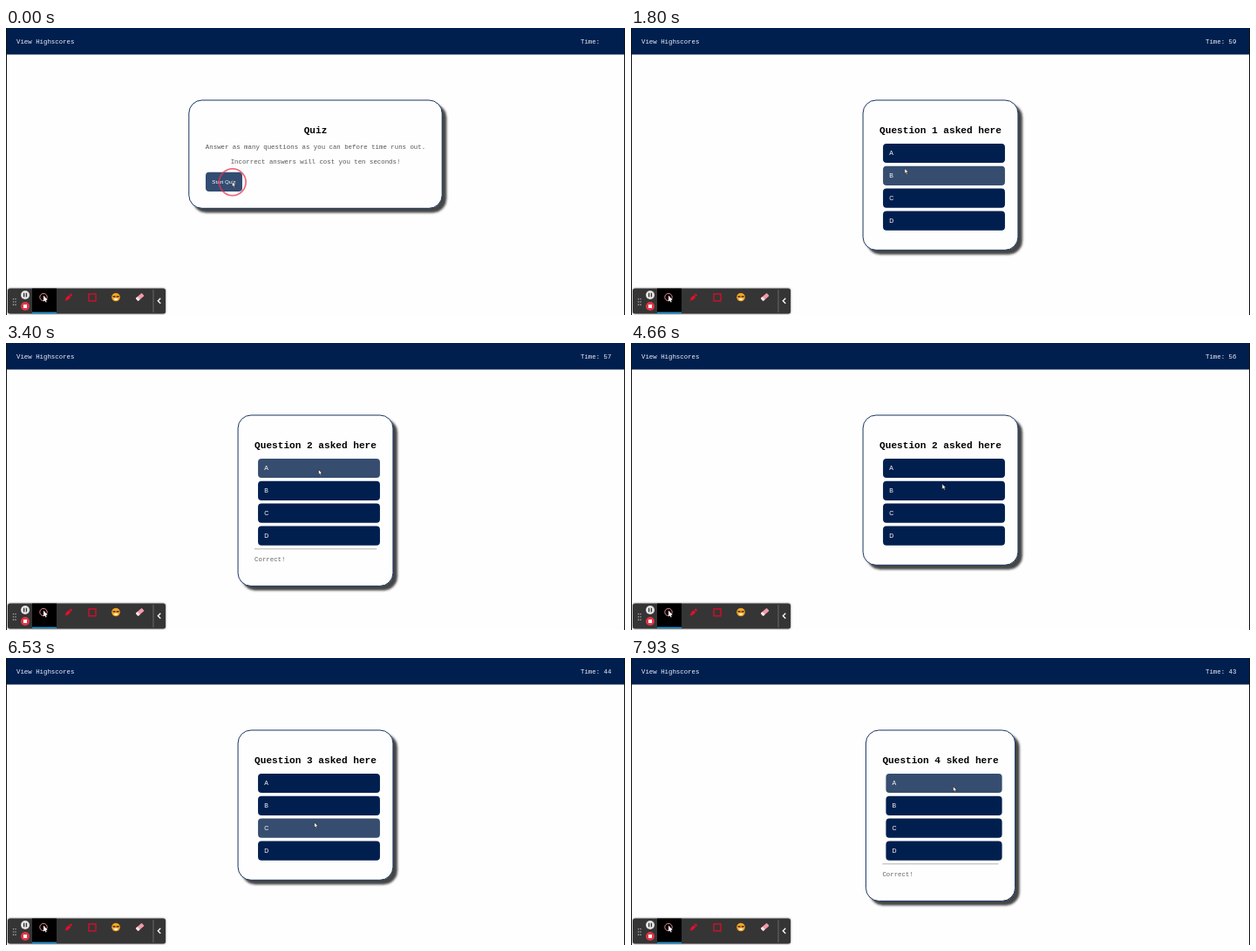
Write an HTML page that moves like this. It is 710x330 px and loops after 8000 ms.

```html
<!DOCTYPE html>
<html lang="en">
<head>
<meta charset="utf-8">
<title>Quiz</title>
<style>
  html, body { margin: 0; width: 100%; height: 100%; overflow: hidden; background: #fefefe; }
  svg { display: block; width: 710px; height: 330px; }
  text { white-space: pre; }
  .mono { font: 7.38px "Courier New", "Liberation Mono", monospace; }
  .title { font: bold 11.1px "Courier New", "Liberation Mono", monospace; fill: #000; }
  .nav { fill: #f0f3f8; }
  .body { fill: #555; }
  .button { font: 6.17px Arial, "Liberation Sans", sans-serif; fill: #fff; }
  .choice { font: 7px Arial, "Liberation Sans", sans-serif; fill: #fff; }
  .tool { font: bold 4.7px Roboto, sans-serif; fill: #fff; text-anchor: middle; }
  .mid { text-anchor: middle; }
</style>
</head>
<body>
<svg viewBox="0 0 710 330">
  <defs>
    <filter id="cardShadow" x="-10%" y="-10%" width="125%" height="125%">
      <feDropShadow dx="4.6" dy="4.6" stdDeviation="1.2" flood-color="#333" flood-opacity=".9"/>
    </filter>
    <filter id="barShadow" x="-5%" y="-20%" width="110%" height="140%">
      <feDropShadow dx="0" dy="0" stdDeviation="1.2" flood-opacity=".6"/>
    </filter>
  </defs>
  <rect width="710" height="330" fill="#fefefe"/>
  <rect width="710" height="30.5" fill="#001f4f"/>
  <path d="M.5 0V330M709.5 0V330" stroke="#111"/>
  <text class="mono nav" x="12" y="17.6">View Highscores</text>
  <text class="mono nav" x="659" y="17.6" id="timer"></text>

  <rect id="card" y="83" rx="15" fill="#fefefe" stroke="#1a3560" filter="url(#cardShadow)"/>
  <text id="heading" class="title mid" x="355" y="120.6"></text>

  <g id="intro">
    <text class="mono body mid" x="355" y="139.4">Answer as many questions as you can before time runs out.</text>
    <text class="mono body mid" x="355" y="156.4">Incorrect answers will cost you ten seconds!</text>
    <rect x="229" y="165.8" width="42" height="22.2" rx="4" fill="#334c72"/>
    <text class="button mid" x="250" y="179">Start Quiz</text>
  </g>
  <g id="choices"></g>
  <g id="feedback">
    <path id="rule" stroke="#aaa" stroke-width=".9"/>
    <text id="verdict" class="mono" fill="#666" y="251.4"></text>
  </g>

  <g id="toolbar">
    <rect x="2" y="299.5" width="181" height="29" rx="2.5" fill="#343434" filter="url(#barShadow)"/>
    <path d="M8.5 311v8M11 311v8" stroke="#aaa" stroke-width="1.3" stroke-dasharray="1.3 2"/>
    <circle cx="22" cy="307" r="5" fill="#e4e4e4"/>
    <path d="M20.6 304.7v4.6M23.4 304.7v4.6" stroke="#333" stroke-width="1.3"/>
    <circle cx="22" cy="320" r="5" fill="#e23645"/>
    <rect x="20" y="318" width="4" height="4" fill="#fff"/>
    <rect x="30" y="299.5" width="28" height="27.5" fill="#000"/>
    <rect x="30" y="326.6" width="28" height="1.5" fill="#1499dc"/>
    <circle cx="43" cy="309.5" r="4.2" fill="none" stroke="#e98791" stroke-width="1"/>
    <path d="M43 307.5v7l1.5-1.4 1.1 2.3 1.1-.5-1-2.2h2z" fill="#fff"/>
    <path d="M67.8 313.8l1-3.7 3.1-2.8 2.4 2.2-3 3.1zM72.5 306.7l1.6-1.4 2 2-1.3 1.5z" fill="#e0102c"/>
    <rect x="95" y="305.8" width="8" height="8" fill="none" stroke="#d20f2b" stroke-width="1.4"/>
    <circle cx="126" cy="309.5" r="4.8" fill="#f5a623"/>
    <path d="M122.3 308.1h3.2v1.5h-2.6zM126.7 308.1h3.2l-.6 1.5h-2.6z" fill="#4a2d18"/>
    <path d="M123.3 311q2.7 3.8 5.4 0z" fill="#fff"/>
    <g transform="rotate(-42 153.5 309.3)">
      <rect x="148.8" y="307.2" width="9.4" height="4.4" rx=".8" fill="#f29aab"/>
      <rect x="148.8" y="307.2" width="3" height="4.4" rx=".8" fill="#fbe1e5"/>
    </g>
    <path d="M169 301v26" stroke="#777" stroke-width=".8"/>
    <path d="M177.3 310.7l-3 3 3 3" fill="none" stroke="#fff" stroke-width="1.3"/>
  </g>

  <circle id="ring" fill="none" stroke="#e8384f" stroke-width="1.8"/>
  <path id="cursor" d="M0 0V6L1.4 4.8 2.4 7 3.5 6.5 2.5 4.4H4.4Z" fill="#fff" stroke="#222" stroke-width=".65"/>
</svg>
<script>
const LOOP = 8000;
const HOVER_LAG = 80;
const RING_TIME = 440;
const $ = id => document.getElementById(id);

// Cursor tip: time, x, y
const path = [
  [1260, 259.3, 176.7], [1700, 301, 166], [2150, 358.4, 145.4],
  [4500, 358.4, 145.4], [4580, 358, 157], [4660, 356.9, 162], [4900, 353.6, 189],
  [6560, 353.6, 189], [7200, 369.4, 147.5]
];
const clicks = [-40, 2930, 4930, 7330];
const scenes = [
  { at: 0, title: "Quiz" },
  { at: 260, title: "Question 1 asked here" },
  { at: 3140, title: "Question 2 asked here", verdict: "Correct!" },
  { at: 5140, title: "Question 3 asked here", verdict: "Wrong!" },
  { at: 7540, title: "Question 4 sked here", verdict: "Correct!" }
];

const choiceTop = i => 132.9 + i * 25.85;
const choiceHeight = 22.2;
$("choices").innerHTML = [..."ABCD"].map((letter, i) =>
  `<rect y="${choiceTop(i)}" height="${choiceHeight}" rx="4"/>
   <text class="choice" y="${choiceTop(i) + 13.4}">${letter}</text>`).join("");
const choiceRects = [...$("choices").querySelectorAll("rect")];
const choiceTexts = [...$("choices").querySelectorAll("text")];

function set(el, attrs) {
  for (const key in attrs) el.setAttribute(key, attrs[key]);
}

function show(el, visible) {
  el.style.display = visible ? "" : "none";
}

function cursorAt(t) {
  const next = path.findIndex(p => p[0] > t);
  if (next === 0) return path[0].slice(1);
  if (next < 0) return path[path.length - 1].slice(1);
  const [t0, x0, y0] = path[next - 1], [t1, x1, y1] = path[next];
  const k = (t - t0) / (t1 - t0);
  return [x0 + (x1 - x0) * k, y0 + (y1 - y0) * k];
}

function timeLeft(t) {
  if (t < scenes[1].at) return "";
  const ticks = Math.max(0, Math.floor((t - 260) / 1000));
  return 60 - ticks - (t >= scenes[3].at ? 10 : 0);
}

function drawQuestion(scene, t, left, width) {
  const [hx, hy] = cursorAt(t - HOVER_LAG);
  choiceRects.forEach((rect, i) => {
    const x = left + 4, top = choiceTop(i);
    const hover = hx >= x && hx <= x + width && hy >= top && hy <= top + choiceHeight;
    set(rect, { x, width, fill: hover ? "#364d70" : "#001f4f" });
    set(choiceTexts[i], { x: x + 7.2 });
  });
  $("verdict").textContent = scene.verdict || "";
  set($("verdict"), { x: left });
  set($("rule"), { d: `M${left} 236.8h${width}` });
}

function draw(t) {
  const scene = scenes.filter(s => s.at <= t).pop();
  const intro = scene === scenes[0];
  const feedback = !!scene.verdict && t < scene.at + 1000;
  const textWidth = intro ? 252.4 : scene.title.length * 6.66;
  const left = 355 - textWidth / 2;

  $("timer").textContent = "Time: " + timeLeft(t);
  $("heading").textContent = scene.title;
  set($("card"), {
    x: left - 19, width: textWidth + 38,
    height: intro ? 124.3 : feedback ? 196.4 : 172.3
  });
  show($("intro"), intro);
  show($("choices"), !intro);
  show($("feedback"), feedback);
  if (!intro) drawQuestion(scene, t, left, textWidth);

  const [x, y] = cursorAt(t);
  set($("cursor"), { transform: `translate(${x} ${y})` });

  const click = clicks.find(c => t >= c && t < c + RING_TIME);
  show($("ring"), click !== undefined);
  if (click !== undefined) {
    const k = (t - click) / RING_TIME;
    set($("ring"), { cx: x + .5, cy: y + .6, r: 15.2 + k * 1.5, opacity: .8 * (1 - k) });
  }
}

const start = performance.now();
function frame() {
  draw((performance.now() - start) % LOOP);
  requestAnimationFrame(frame);
}
frame();
</script>
</body>
</html>
```
